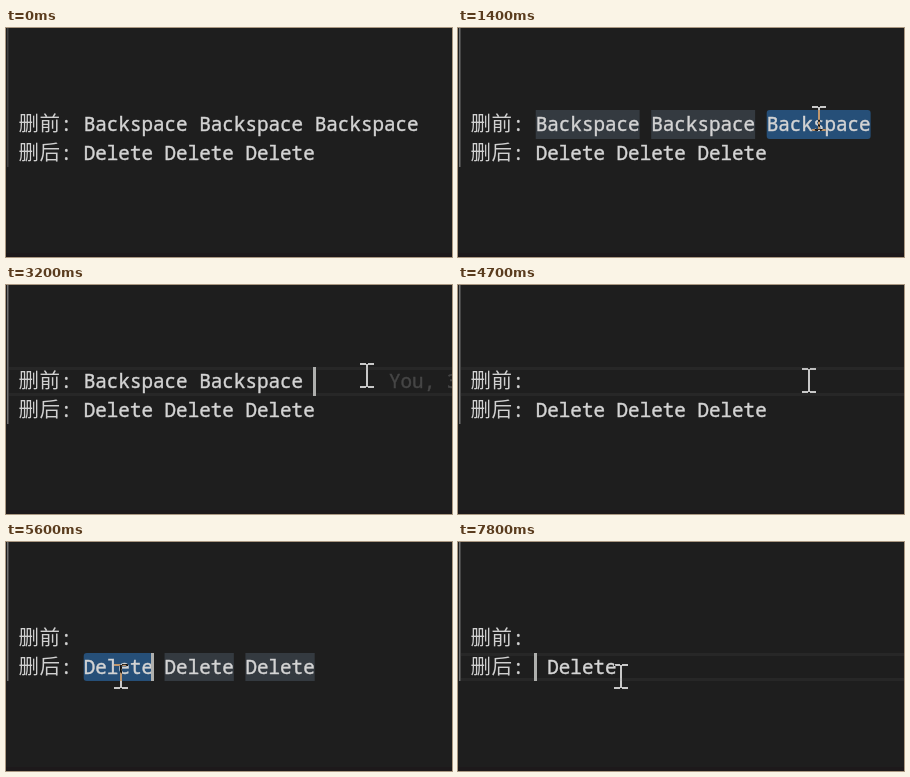
An HTML page with a canvas for the animation above (8000 ms loop, 446x229 px).

```html
<!DOCTYPE html>
<html lang="zh">
<head>
<meta charset="utf-8">
<style>
  html, body { margin: 0; width: 446px; height: 229px; overflow: hidden; background: #1e1e1e; }
  canvas { display: block; }
</style>
</head>
<body>
<canvas id="stage" width="446" height="229"></canvas>
<script>
const ctx = document.getElementById('stage').getContext('2d');
const LOOP = 8000, STEP = 100, BLINK = 465;
const CHAR = 11.55, LEFT = 77.7;
const MONO = '19.25px "Noto Sans Mono", "DejaVu Sans Mono", monospace';
const HAN = '300 20.5px "Noto Sans CJK SC", "Noto Sans CJK", sans-serif';

// Each row: a word is double-clicked, then words are cut one by one.
const ROWS = [
  { top: 82, h: 29, base: 103, label: '删前', word: 'Backspace', picked: 2,
    click: 800, cuts: [3200, 3500, 3810], note: 'You, 3', noteTime: [3200, 3300],
    text: n => 'Backspace Backspace Backspace'.slice(0, 30 - n * 10),
    caret: n => Math.min(29, 30 - n * 10) },
  { top: 111, h: 28, base: 132, label: '删后', word: 'Delete', picked: 0,
    click: 5490, cuts: [7600, 7800], note: 'You, 1', noteTime: [5700, 7600],
    text: n => 'Delete Delete Delete'.slice(n && n * 7 - 1),
    caret: n => n ? 0 : 6 }
];

// Pointer way points: time, x, y
const PATH = [[200, 385, 115], [300, 354, 100], [500, 361, 91], [4600, 361, 91],
  [4700, 351, 96], [5300, 115, 135], [5800, 115, 135], [5900, 163, 135]];

const within = (t, from, to) => t >= from && t < to;
const ease = p => (1 - Math.cos(Math.PI * p)) / 2;

function pointerAt(t) {
  const i = PATH.findLastIndex(p => p[0] <= t);
  const [t0, x0, y0] = PATH[i], [t1, x1, y1] = PATH[i + 1] || [LOOP, x0, y0];
  const p = ease((t - t0) / (t1 - t0));
  return [x0 + (x1 - x0) * p, y0 + (y1 - y0) * p].map(Math.round);
}

function rect(color, x, y, w, h, r = 0) {
  ctx.fillStyle = color;
  ctx.beginPath();
  ctx.roundRect(x, y, w, h, r);
  ctx.fill();
}

function type(str, x, y, color) {
  ctx.font = MONO;
  ctx.fillStyle = ctx.strokeStyle = color;
  ctx.lineWidth = 0.4;
  [...str].forEach((c, i) => {
    ctx.fillText(c, x + i * CHAR, y);
    ctx.strokeText(c, x + i * CHAR, y);
  });
}

function drawPointer([x, y]) {
  ctx.globalCompositeOperation = 'difference';
  ctx.fillStyle = '#e6e6e6';
  ctx.beginPath();
  for (const top of [y - 13, y + 10]) {
    ctx.rect(x - 7, top, 6, 2);
    ctx.rect(x + 1, top, 6, 2);
  }
  ctx.rect(x - 1, y - 12, 2, 23);
  ctx.fill();
  ctx.globalCompositeOperation = 'source-over';
}

function drawRow(row, t, active) {
  const { top, h, base, word, picked, click, cuts } = row;
  const done = cuts.filter(c => c <= t).length;

  if (active && done) {
    rect('#272727', 3, top, 443, 3);
    rect('#272727', 3, top + h - 3, 443, 3);
  }
  if (active && !done) {
    for (let i = 0; i < 3; i++) {
      const x = LEFT + i * (word.length + 1) * CHAR, w = word.length * CHAR;
      if (i === picked) rect('#264f78', x, top, w, h, 3);
      else if (t >= click + 100) rect('#343a40', x, top, w, h);
    }
  }

  ctx.font = HAN;
  ctx.fillStyle = '#d0d0d0';
  [...row.label].forEach((c, i) => ctx.fillText(c, 12.6 + i * 21, base));
  type(':', 54.6, base, '#d4d4d4');
  type(row.text(done), LEFT, base, '#d4d4d4');
  if (within(t, ...row.noteTime)) type(row.note, 383, base, '#464646');

  // The caret restarts its blink at every action.
  const last = Math.max(click + 50, ...cuts.filter(c => c <= t));
  if (active && (t < last || Math.floor((t - last) / BLINK) % 2 === 0))
    rect('#aeafad', Math.round(LEFT - 1.7 + row.caret(done) * CHAR), top, 3, h);
}

function draw(t) {
  rect('#1e1e1e', 0, 0, 446, 229);
  rect('#1d191b', 0, 225, 446, 4);
  rect(t < ROWS[0].click ? '#404040' : '#707070', 1, 0, 1.5, 139);
  const current = ROWS.findLast(r => r.click <= t);
  ROWS.forEach(r => drawRow(r, t, r === current));
  if (t >= PATH[0][0]) drawPointer(pointerAt(t));
}

const start = performance.now();
function tick() {
  const t = (performance.now() - start) % LOOP;
  draw(Math.floor(t / STEP) * STEP);
  requestAnimationFrame(tick);
}
tick();
</script>
</body>
</html>
```
